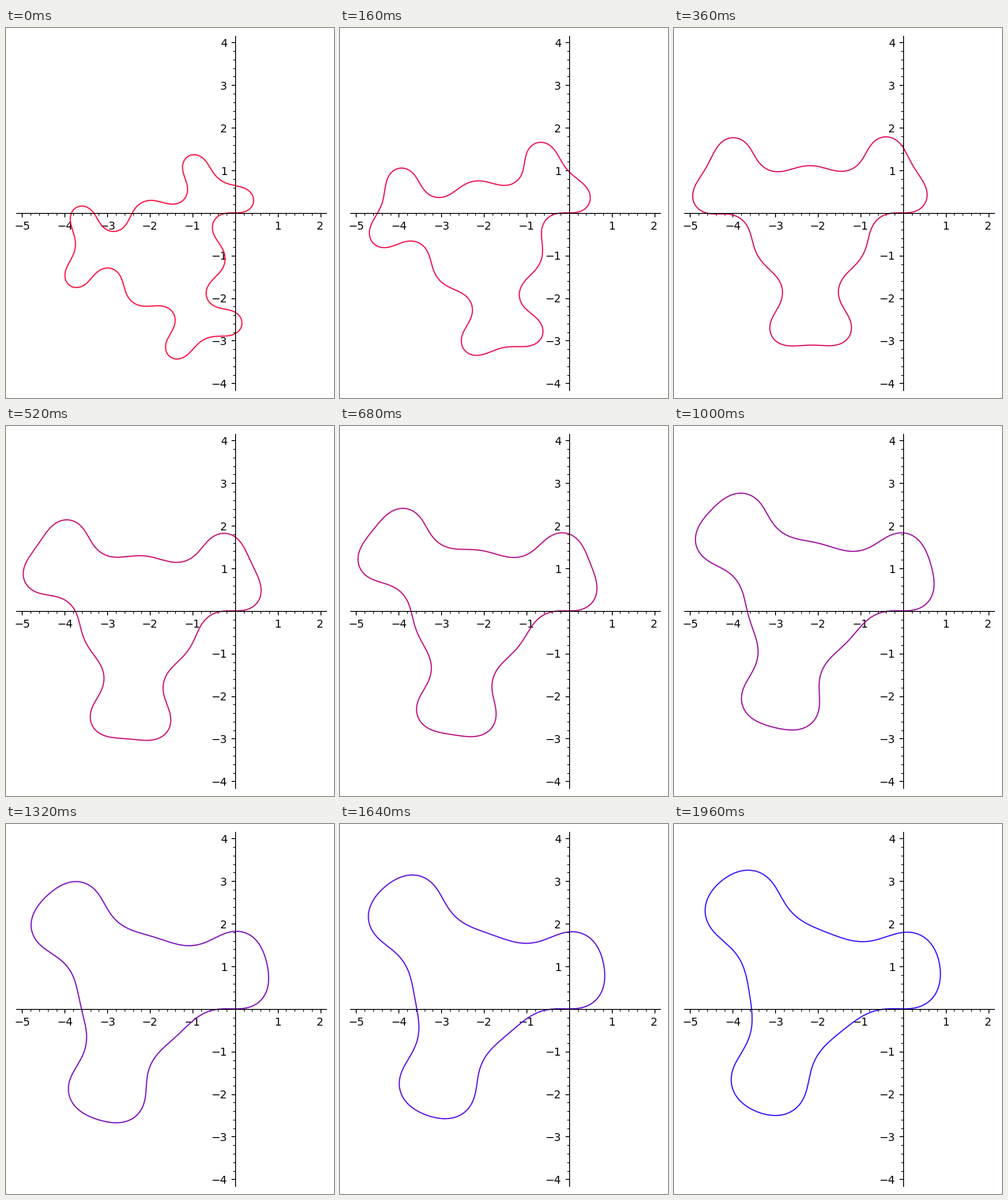
Animation of 415 by 468 pixels, one loop 2000 ms. Source, as a matplotlib script:

```python
import numpy as np
import matplotlib.pyplot as plt
from matplotlib.animation import FuncAnimation
from matplotlib.ticker import MultipleLocator

W, H, DPI = 415, 468, 100
FRAMES, INTERVAL = 50, 40
UNIT = 53.87             # pixels per data unit
X0, Y0 = 289.83, 233.88  # origin in pixels, from the top left
XLIM, YLIM = (-5.14, 2.14), (-4.16, 4.16)

plt.rcParams["font.family"] = "DejaVu Sans"
plt.rcParams["font.size"] = 10

s = np.linspace(0, 6 * np.pi, 3601)


def running_integral(f):
    """Cumulative trapezoid rule over s."""
    steps = (f[1:] + f[:-1]) / 2 * np.diff(s)
    return np.concatenate(([0], np.cumsum(steps)))


def curve(t):
    """Unit-speed curve given by its tangent angle."""
    theta = s / 3 + (1 - np.cos(s)) + (1 - np.cos(3 * s)) / t
    return running_integral(np.cos(theta)), running_integral(np.sin(theta))


def make_axes(fig):
    ax = fig.add_axes([
        (X0 + XLIM[0] * UNIT) / W,
        (H - Y0 + YLIM[0] * UNIT) / H,
        (XLIM[1] - XLIM[0]) * UNIT / W,
        (YLIM[1] - YLIM[0]) * UNIT / H,
    ])
    ax.patch.set_visible(False)
    ax.set_xticks([v for v in range(-5, 3) if v])
    ax.set_yticks([v for v in range(-4, 5) if v])
    ax.set(xlim=XLIM, ylim=YLIM)
    for axis in (ax.xaxis, ax.yaxis):
        axis.set_minor_locator(MultipleLocator(0.2))
    for side in ("left", "bottom"):
        ax.spines[side].set_position(("data", 0))
    for side in ("right", "top"):
        ax.spines[side].set_visible(False)
    return ax


fig = plt.figure(figsize=(W / DPI, H / DPI), dpi=DPI, facecolor="white")
ax = make_axes(fig)
line, = ax.plot([], [], lw=1)


def update(n):
    t = 1 + 4 * n / (FRAMES - 1)
    line.set_data(*curve(t))
    line.set_color(((6 - t) / 5, 0, t / 5))
    return line,


anim = FuncAnimation(fig, update, frames=FRAMES, interval=INTERVAL,
                     repeat=True, repeat_delay=0)
plt.show()
```
